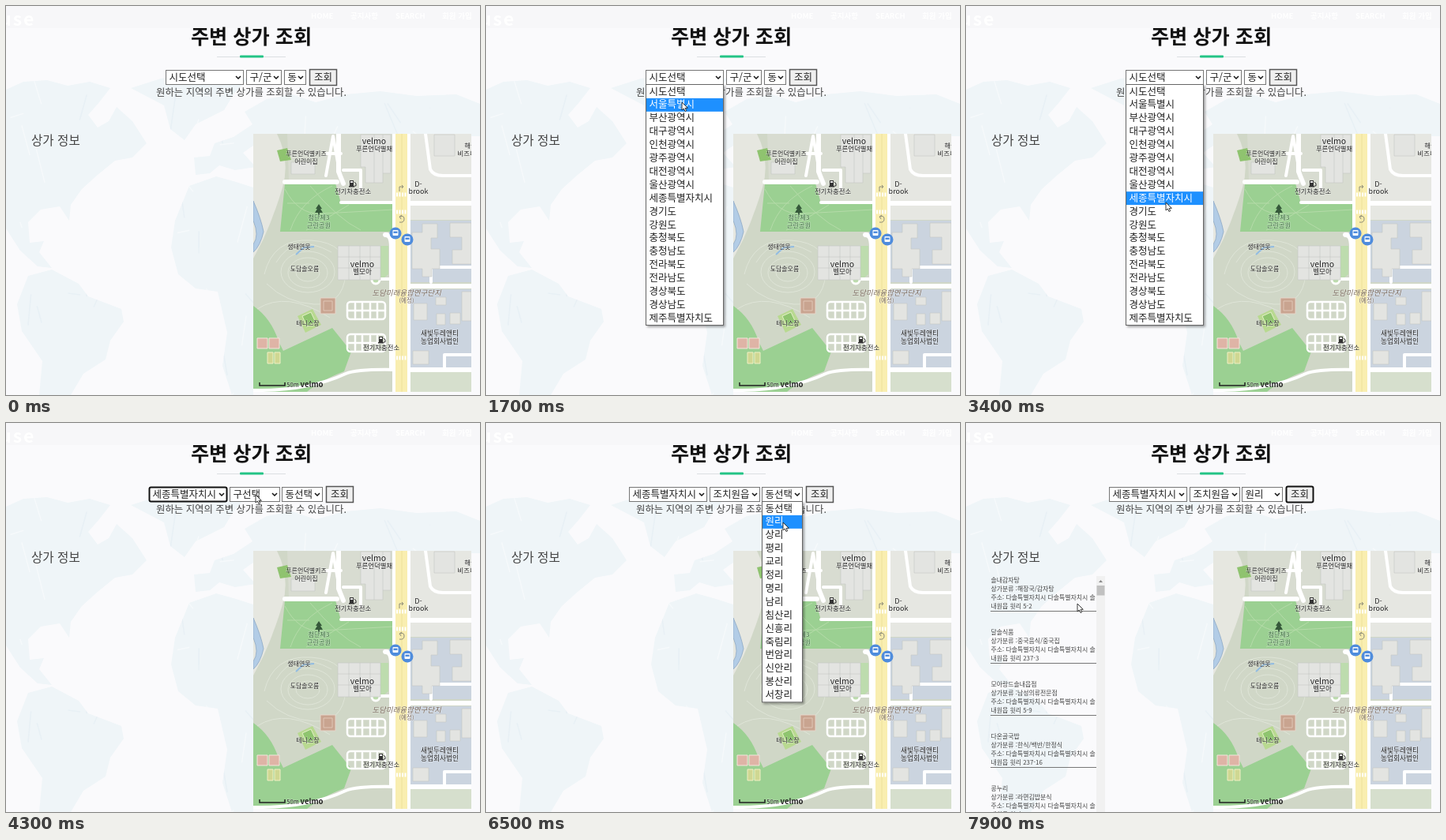
Animation of 600 by 493 pixels, one loop 8 s. Source, as an HTML page:

```html
<!DOCTYPE html>
<html lang="ko">
<head>
<meta charset="utf-8">
<title>주변 상가 조회</title>
<style>
html, body { margin: 0; width: 100%; height: 100%; overflow: hidden; background: #fafafc; }
svg { display: block; width: 100vw; height: 100vh; font-family: 'Noto Sans CJK KR', 'Noto Sans CJK', 'Noto Sans', sans-serif; }
text { white-space: pre; }
.road { fill: none; stroke: #fff; stroke-linejoin: round; stroke-linecap: round; }
.trail { fill: none; stroke: #b5dba9; stroke-width: 1; }
.ring { fill: none; stroke: #dfe5d8; stroke-width: 1; }
.house { fill: #e3e4e1; stroke: #c3c6c4; stroke-width: .6; }
</style>
</head>
<body>
<svg viewBox="0 0 600 493">
  <defs>
    <clipPath id="mapClip"><rect x="313" y="162" width="276" height="327"/></clipPath>
    <clipPath id="landClip"><use href="#land"/></clipPath>
    <filter id="shadow" x="-20%" width="150%" height="120%"><feDropShadow dx="2" dy="2" stdDeviation="1.5" flood-opacity=".35"/></filter>
    <g id="charger">
      <path d="M-4 -4H1V3H-4Z M-5 3H2V4.500H-5Z" fill="#333"/>
      <path d="M2 -2L4 0V3H2" fill="none" stroke="#333"/>
      <path d="M-3 -3H0V-1H-3Z" fill="#fff"/>
    </g>
    <g id="bus">
      <circle r="7.500" fill="#4f8cdc"/>
      <rect x="-3.500" y="-4" width="7" height="7" rx="1" fill="#fff"/>
      <path d="M-2.500 -2.500H2.500V0H-2.500Z M-2.500 3H-1V4.500H-2.500Z M1 3H2.500V4.500H1Z" fill="#4f8cdc"/>
    </g>
    <g id="parking" class="road" stroke-width="2.500">
      <rect x="1" y="1" width="48" height="22" rx="4"/>
      <path d="M1 12H49M11 3V21M20 3V21M30 3V21M39 3V21"/>
    </g>
  </defs>

  <rect width="600" height="493" fill="#fafafc"/>
  <path id="land" fill="#eff5f8" d="M0 106L22 96 52 94 78 101 106 96 132 104 118 122 104 138 116 154 130 146 140 128 160 146 178 174 160 192 138 196 116 214 96 232 82 252 80 272 68 254 44 258 28 274 30 300 48 298 42 312 58 332 40 330 18 310 0 282Z
    M28 342L58 334 92 352 104 368 146 384 149 400 132 424 126 448 98 466 82 493H42L46 450 20 412 14 378Z
    M158 104L196 92 244 84 306 92 288 112 276 132 240 150 226 170 208 156 200 126Z
    M232 228L266 216 288 222 313 230V493H286L274 456 280 414 268 362 240 358 218 340 209 306 214 272Z
    M240 214L238 192 258 190 264 174 288 166 312 150 302 134 330 118 362 112 392 122 430 112 474 108 520 114 570 112 600 124V165H330L300 186 316 204 290 208 270 202 258 212Z"/>
  <g id="creases" clip-path="url(#landClip)" fill="none"></g>
  <rect width="600" height="28" fill="#f7f7f9" opacity=".8"/>
  <path d="M267 64.500H354" stroke="#dcdfe2"/>
  <rect x="296" y="62.500" width="30" height="3" rx="1" fill="#24c486"/>

  <g clip-path="url(#mapClip)">
    <rect x="313" y="162" width="276" height="327" fill="#d0d7c7"/>
    <path d="M313 162H343Q360 196 350 230T326 295L313 320Z" fill="#e6e7e0"/>
    <path d="M356 162H493V250H424L417 222H358Z" fill="#d8dcd1"/>
    <path d="M508 162H589V271H508Z" fill="#e6e7e2"/>
    <path d="M313 247Q323 270 326 286Q322 304 313 312V302Q321 291 313 272Z" fill="#b2cce6" stroke="#8da9c6" stroke-width=".8"/>
    <path d="M353 225H417L424 250H493V286H347Z" fill="#9bd092"/>
    <path d="M313 380Q336 396 345 425L351 437 413 408 437 438 428 463Q397 475 381 489H313Z" fill="#9bd092"/>
    <path d="M343 183L356 180 361 195 347 197Z" fill="#8fc36f"/>
    <path d="M424 304H484V340L472 350 444 322Z" fill="#bddcae"/>
    <path d="M508 272H589V350H511Z M511 359H589V458H511Z" fill="#cbd4df"/>
    <path d="M509 464H589V489H509Z" fill="#d6dfcd"/>
    <path class="trail" d="M353 232Q370 264 397 263T490 258M360 284Q372 247 413 228M385 228Q420 270 449 284M434 252Q408 268 380 284M356 250H384"/>
    <path class="ring" d="M327 340Q338 294 386 297T430 340T390 378T330 352M342 325Q365 286 412 312M318 384Q355 360 410 395"/>
    <g class="ring"><ellipse cx="382" cy="337" rx="34" ry="26"/><ellipse cx="382" cy="338" rx="25" ry="19"/><ellipse cx="382" cy="338" rx="15" ry="11"/></g>
    <path d="M367 315L377 306 390 305" fill="none" stroke="#91bce2" stroke-width="2"/>

    <path class="road" stroke-width="6" d="M353 223H419M480 290Q488 289 488 306V460M421 162V210L427 225M508 355H589M508 461H589M508 250H589"/>
    <path class="road" stroke-width="4" d="M405 215L414 165 423 215M406 187H424M427 208H449V232M424 249H493M531 162L537 207Q541 215 553 215H589M313 487Q383 488 430 466Q445 460 493 461M468 346H487M538 350V331H589M555 458V442H589"/>
    <rect x="489" y="162" width="23" height="327" fill="#fff"/>
    <rect x="493" y="162" width="15" height="327" fill="#f9eeb0"/>
    <path d="M501 162V489" stroke="#eddc98" stroke-width=".8"/>
    <path d="M494 239H507M494 261H507M494 446H507" stroke="#fff" stroke-width="5" stroke-dasharray="2 1.500"/>
    <path d="M498 235V229H503M501 227L503 229 501 231M498 274Q504 275 504 270T499 267M501 265L498 267 500 270" fill="none" stroke="#8c8b78"/>
    <circle cx="468" cy="347" r="5" fill="#bddcae" stroke="#fff" stroke-width="3"/>

    <g class="house">
      <path d="M449 163H487V212H477V224H455V204H449Z M420 304H474V347H420Z M542 163H568V190H542Z M361 198H391V213H361Z"/>
      <path d="M514 287H527V276H546V294H538V308H549V333H539V343H527V333H514Z M562 275H589V327H565V309H577V293H562Z"/>
      <path d="M516 377H533V398H516Z M544 369H557V379H544Z M562 389H575V403H562Z M577 362H589V399H577Z M515 437H535V454H515Z M545 390H556V404H545Z"/>
      <path fill="none" d="M420 318H474M420 332H474M434 304V347M448 304V347M461 304V347M455 180H487M466 163V224M477 163V212"/>
    </g>
    <use href="#parking" x="431" y="374"/>
    <use href="#parking" x="431" y="415"/>
    <path d="M398 370H417V390H398Z" fill="#c9a490" stroke="#e5d5c9"/>
    <path d="M402 374H413V386H402Z" fill="none" stroke="#dfc5b5"/>
    <path d="M369 393L388 384 399 404 379 414Z" fill="#b8d990"/>
    <path d="M375 393L386 388 392 401 381 406Z" fill="#8fc56f" stroke="#e4efc8"/>
    <path d="M318 421H331V434H318ZM333 421H346V434H333Z" fill="#dfb4a6" stroke="#f4e4dc"/>
    <path d="M331 439H338V453H331ZM340 439H347V453H340Z" fill="#cfd792" stroke="#f0efc4"/>
    <path d="M396 251L400 257H398L401 262H397V265H395V262H391L394 257H392Z" fill="#35583a"/>
    <use href="#charger" x="439" y="225"/>
    <use href="#charger" x="476" y="423"/>
    <use href="#bus" x="493" y="288"/>
    <use href="#bus" x="508" y="296"/>
    <path d="M321 477V481H353V477" fill="none" stroke="#222" stroke-width="1.500"/>
    <g id="mapLabels"></g>
  </g>
  <g id="pageLabels"></g>
  <g id="live"></g>
</svg>
<script>
const byId = id => document.getElementById(id);
const SIZE = 12.5, ROW = 16.9, LIST_TOP = 99.5;

// y is the vertical middle of the glyphs
const label = (x, y, size, str, attrs = '') =>
  `<text x="${x}" y="${y + size * .37}" font-size="${size}" ${attrs}>${str}</text>`;
const rect = (x, y, w, h, attrs) => `<rect x="${x}" y="${y}" width="${w}" height="${h}" ${attrs}/>`;

const mapStyle = (color, extra = '') =>
  `text-anchor="middle" fill="${color}" font-weight="500" stroke="#fff" stroke-opacity=".4" stroke-width="1" paint-order="stroke" ${extra}`;
const mapLabels = [
  [380, 187, 8, '푸른언덕별키즈'], [380, 197, 8, '어린이집'],
  [466, 171, 10.5, 'velmo'], [466, 181, 8.4, '푸른언덕별채'],
  [439, 235, 8.4, '전기차충전소'], [522, 226, 9, 'D-'], [522, 235, 9, 'brook'],
  [588, 177, 8.4, '해솔'], [587, 187, 8.4, '비즈니스'],
  [371, 305, 8, '생태연못'], [378, 333, 7.9, '도담솔오름'],
  [451, 327, 10.5, 'velmo'], [451, 337, 8.6, '벨모아'],
  [382, 402, 8, '테니스장'], [549, 415, 8.7, '새빛두레앤티'], [549, 425, 8.7, '농업회사법인'],
  [475, 433, 8.4, '전기차충전소'], [363, 480, 7.5, '50m']
];
const GREEN = mapStyle('#3d6b40'), BROWN = '#77675a';
byId('mapLabels').innerHTML = mapLabels.map(l => label(...l, mapStyle('#222'))).join('') +
  label(396, 268, 8.2, '첨단제3', GREEN) +
  label(396, 278, 8.2, '근린공원', GREEN) +
  label(507, 363, 9.5, '도담미래융합연구단지', mapStyle(BROWN, 'font-style="italic"')) +
  label(507, 373, 7.5, '(예정)', mapStyle(BROWN)) +
  label(387, 479, 9.5, 'velmo', 'text-anchor="middle" fill="#222" font-weight="700"');

const NAV = 'fill="#fff" font-weight="700"';
byId('pageLabels').innerHTML =
  label(-8, 16, 23, 'use', NAV + ' letter-spacing="2"') +
  label(386, 12, 9.5, 'HOME', NAV) + label(436, 12, 9.5, '공지사항', NAV) +
  label(493, 12, 9.5, 'SEARCH', NAV) + label(552, 12, 9.5, '회원 가입', NAV) +
  label(310.5, 39, 25.2, '주변 상가 조회', 'text-anchor="middle" font-weight="700" fill="#111"') +
  label(190, 109, 12.4, '원하는 지역의 주변 상가를 조회할 수 있습니다.', 'font-weight="300" fill="#444"') +
  label(32, 170, 15.6, '상가 정보', 'font-weight="300" fill="#444"');

// Faint folds in the paper map
let seed = 7;
const random = () => (seed = seed * 16807 % 2147483647) / 2147483647;
byId('creases').innerHTML = Array.from({ length: 90 }, () => {
  const x = random() * 600, y = 80 + random() * 413;
  return `<path d="M${x} ${y}l${random() * 40 - 20} ${random() * 50}" stroke="${random() < .5 ? '#fff' : '#dde9ef'}" stroke-width="1.500" opacity=".4"/>`;
}).join('');

const provinces = '시도선택 서울특별시 부산광역시 대구광역시 인천광역시 광주광역시 대전광역시 울산광역시 세종특별자치시 경기도 강원도 충청북도 충청남도 전라북도 전라남도 경상북도 경상남도 제주특별자치도'.split(' ');
const districts = ['구선택', '조치원읍'];
const villages = '동선택 원리 상리 평리 교리 정리 명리 남리 침산리 신흥리 죽림리 번암리 신안리 봉산리 서창리'.split(' ');
const shops = [
  ['솔내감자탕', '해장국/감자탕', '5-2'], ['달솔식품', '중국음식/중국집', '237-3'],
  ['모아랑드솔내읍점', '남성의류전문점', '5-9'], ['다온골국밥', '한식/백반/한정식', '237-16'],
  ['콩누리', '라면김밥분식', '5-4']
];

// time, x, y of the pointer tip
const pointerPath = [
  [100, 487, 422], [600, 240, 92], [800, 242, 91], [1000, 242, 91], [1700, 248, 122], [1900, 249, 126],
  [2400, 259, 282], [2800, 262, 346], [3200, 252, 246], [3300, 252, 246], [3400, 253, 249], [3600, 253, 249],
  [4300, 316, 91], [4400, 317, 92], [4500, 318, 104], [4600, 318, 104], [5000, 320, 123], [5200, 320, 123],
  [5800, 373, 91], [6000, 374, 92], [6100, 375, 132], [6300, 375, 132], [6500, 376, 126], [6700, 376, 126],
  [7100, 424, 90], [7400, 424, 90], [7900, 141, 229]
];
function pointerAt(t) {
  const i = pointerPath.findIndex(p => p[0] >= t);
  const b = pointerPath[i], a = pointerPath[Math.max(i - 1, 0)];
  const k = a === b ? 0 : (t - a[0]) / (b[0] - a[0]);
  return [a[1] + (b[1] - a[1]) * k, a[2] + (b[2] - a[2]) * k];
}

const frameAttrs = focused => focused
  ? 'rx="2" stroke="#111" stroke-width="2"' : 'stroke="#767676"';
const select = (x, w, value, focused) =>
  rect(x + .5, 81.5, w - 1, 18, 'fill="#fff" ' + frameAttrs(focused)) +
  label(x + 4.5, 90, SIZE, value, 'fill="#222"') +
  `<path d="M${x + w - 10} 89l3 3 3-3" fill="none" stroke="#111" stroke-width="1.500"/>`;
const button = (x, focused) =>
  rect(x + .5, 80.5, 34, 20, 'fill="#efefef" ' + (focused ? frameAttrs(true) : 'stroke="#555" stroke-width="1.500"')) +
  label(x + 17.5, 90, SIZE, '조회', 'text-anchor="middle" fill="#222"');

function dropdown(x, w, options, pointerY) {
  const active = Math.max(0, Math.floor((pointerY - LIST_TOP) / ROW));
  return rect(x + .5, LIST_TOP, w - 1, options.length * ROW + .8, 'fill="#fff" stroke="#666" filter="url(#shadow)"') +
    options.map((option, i) => {
      const y = LIST_TOP + i * ROW, on = i === active;
      return (on ? rect(x + 1, y + .5, w - 2, ROW, 'fill="#1e90ff"') : '') +
        label(x + 4.5, y + 8.4, SIZE, option, `fill="${on ? '#fff' : '#222'}"`);
    }).join('');
}

const shopList = () => shops.map(([name, kind, lot], i) => {
  const y = 199 + i * 66;
  const lines = [name, `상가분류 :${kind}`, '주소: 다솔특별자치시 다솔특별자치시 솔', `내원읍 윗리 ${lot}`];
  return lines.map((line, n) => label(31.5, y + n * 11, 7.9, line, 'fill="#444"')).join('') +
    `<path d="M31 ${y + 39.5}H165" stroke="#777"/>`;
}).join('') +
  rect(165, 194, 11, 299, 'fill="#f1f1f1"') + rect(165.5, 206, 10, 12.5, 'fill="#c1c1c1"') +
  '<path d="M168 202l2.500-3 2.500 3z" fill="#888"/>';

const cursor = (x, y) =>
  `<path transform="translate(${x} ${y})" d="M0 0V10L2.300 8 4 11.500 5.700 10.700 4.100 7.300H7.300Z" fill="#fff" stroke="#222" stroke-width=".9"/>`;

function scene(t) {
  const within = (from, to) => t >= from && t < to;
  const [px, py] = pointerAt(t);
  const loaded = t >= 3600;
  const [x1, x2, x3, x4] = loaded ? [181, 283, 349, 405] : [202, 304, 352, 384];
  let out = select(x1, 99, loaded ? provinces[8] : provinces[0], within(3600, 4400)) +
    select(x2, loaded ? 64 : 45, !loaded ? '구/군' : districts[+(t >= 5200)], within(5200, 5900)) +
    select(x3, loaded ? 52 : 28, !loaded ? '동' : villages[+(t >= 6700)], within(6700, 7200)) +
    button(x4, t >= 7200);
  if (within(700, 3600)) out += dropdown(x1, 99, provinces, py);
  if (within(4400, 5200)) out += dropdown(x2, 64, districts, py);
  if (within(5900, 6700)) out += dropdown(x3, 52, villages, py);
  if (t >= 7500) out += shopList();
  if (t >= 100) out += cursor(px, py);
  return out;
}

const start = performance.now();
let shown = -1;
function tick() {
  const t = Math.floor((performance.now() - start) % 8000 / 100) * 100;
  if (t !== shown) byId('live').innerHTML = scene(shown = t);
  requestAnimationFrame(tick);
}
tick();
</script>
</body>
</html>
```
